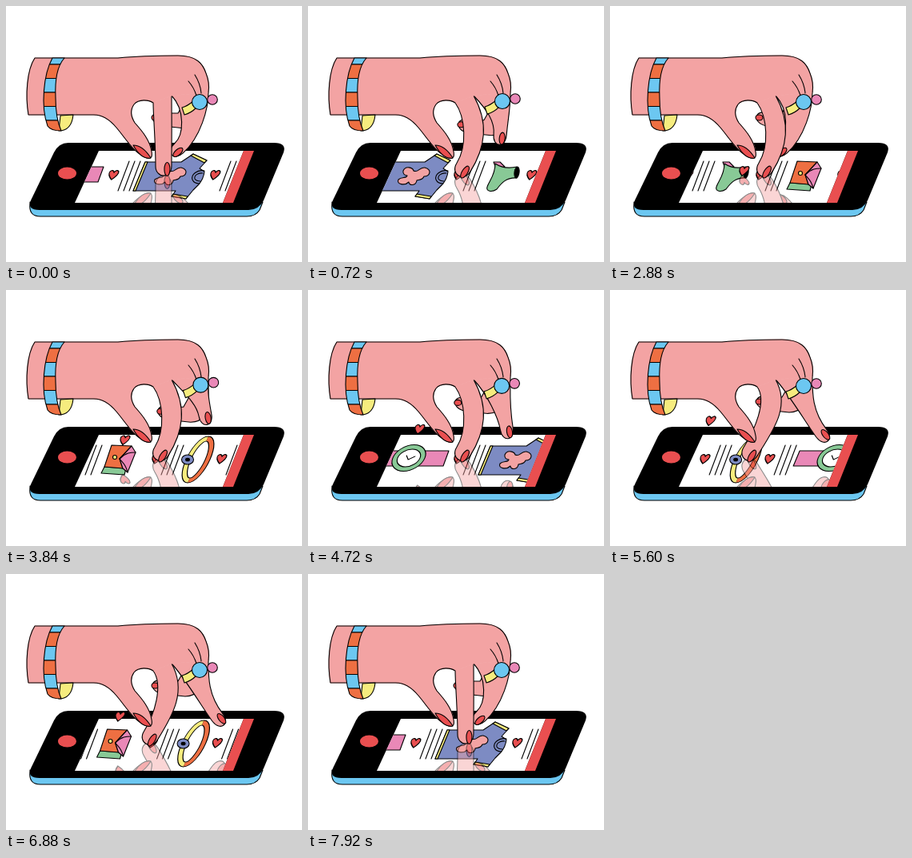
An HTML page for the animation above (8 s loop, 370 by 320 pixels).

```html
<!DOCTYPE html>
<html lang="en">
<head>
<meta charset="utf-8">
<title>Shopping swipe</title>
<style>
html, body { margin: 0; width: 100%; height: 100%; overflow: hidden; background: #fff; }
svg { display: block; width: 100vw; height: 100vh; }
.ink { stroke: #000; stroke-width: 1.1; stroke-linejoin: round; stroke-linecap: round; }
.line { fill: none; }
.skin { fill: #f3a3a3; }
.red { fill: #e94f50; }
.orange { fill: #ee6f42; }
.blue { fill: #6cc7f1; }
.yellow { fill: #f6ec7e; }
.pink { fill: #e988b7; }
.green { fill: #88c996; }
.denim { fill: #7d8bc3; }
.white { fill: #fff; }
</style>
</head>
<body>
<svg viewBox="0 0 370 320">
  <defs>
    <clipPath id="screen"><path d="M116 181H297L271 246H86Z"/></clipPath>
    <clipPath id="band"><path id="bandShape" d="M58 65C47 85 43 125 52 150Q56 156 69 156Q62 140 62 115C61 95 64 75 73 65Z"/></clipPath>
    <path id="heart" class="ink red" transform="skewX(-20) scale(1.1)" d="M0 5.5C-4 2-6-1-5-3.5C-3.5-6-.8-5 0-2.5C.8-5 3.5-6 5-3.5C6-1 4 2 0 5.5Z"/>
    <path id="rules" class="ink line" d="M20 194L6 231M27 194L13 231M34 194L20 231"/>

    <g id="shirt" class="ink">
      <path class="denim" d="M-87 195H-42L-27 185L-10 193L-19 203L-13 207Q-14 216-20 223L-27 230L-36 241L-54 238L-49 231H-102Z"/>
      <path class="yellow" d="M-27 185L-10 193L-13 196L-30 187ZM-54 238L-36 241L-34 238L-52 235ZM-87 195H-84L-99 231H-102Z"/>
      <path class="line" d="M-13 206C-22 204-30 211-28 217Q-26 222-19 222M-15 209C-21 208-26 212-25 216Q-23 219-18 219"/>
      <path class="skin" d="M-69 206C-66 199-57 202-56 206C-50 209-49 201-42 202C-32 205-36 213-43 213C-45 218-50 217-52 218C-53 225-62 225-62 220C-67 225-78 223-75 217C-71 213-65 216-64 212Q-70 211-69 206Z"/>
    </g>
    <g id="boot" class="ink">
      <path class="pink" d="M-47 195H-39L-33 201L-44 203Z"/>
      <path class="green" d="M-45 197C-36 203-27 203-18 201V215C-31 214-37 221-43 229C-49 233-57 232-55 226C-53 219-45 212-45 197Z"/>
      <ellipse cx="-18" cy="208" rx="3" ry="7" transform="rotate(8 -18 208)"/>
    </g>
    <g id="bag" class="ink">
      <path class="green" d="M-65 221L-38 223L-40 231L-69 229Z"/>
      <path class="orange" d="M-56 194L-31 195L-46 211L-42 223L-65 221Z"/>
      <path class="pink" d="M-31 195L-26 203L-36 228L-42 223L-46 211Z"/>
      <path class="line" d="M-46 211C-38 203-32 203-26 203M-46 211C-42 216-38 218-36 228"/>
      <circle class="yellow" cx="-52" cy="209" r="2.5"/>
    </g>
    <g id="bangle">
      <g transform="translate(-29 212) skewX(-24)" fill="none">
        <ellipse rx="12" ry="26" stroke="#000" stroke-width="7"/>
        <path d="M0-26A12 26 0 0 0 0 26" stroke="#f6ec7e" stroke-width="4.8"/>
        <path d="M0-26A12 26 0 0 1 0 26" stroke="#ee6f42" stroke-width="4.8"/>
      </g>
      <ellipse class="ink denim" cx="-42" cy="212" rx="7.5" ry="6"/>
      <ellipse cx="-42" cy="212" rx="3" ry="2.3"/>
    </g>
    <g id="watch" class="ink">
      <path class="pink" d="M-105 201H-12L-19 220H-113Z"/>
      <g transform="translate(-62 210) skewX(-22)">
        <ellipse class="green" rx="20" ry="16.5"/>
        <ellipse class="white" rx="14" ry="11"/>
        <path class="line" d="M-4-3L0 2L7-2"/>
      </g>
    </g>
    <g id="belt"></g>
  </defs>

  <!-- phone -->
  <path class="ink blue" d="M30 245H321L317 255Q312 263 301 263H43Q28 263 30 247Z"/>
  <path d="M78 171H335Q351 171 347 183L322 243Q316 255 303 255H42Q26 255 31 243L60 183Q66 171 78 171Z"/>
  <ellipse class="red" cx="76.5" cy="209" rx="11.5" ry="7.5"/>
  <path class="white" d="M116 181H297L271 246H86Z"/>
  <g clip-path="url(#screen)">
    <g id="strip"><use href="#belt" x="-544"/><use href="#belt"/></g>
    <use href="#hand" transform="matrix(1 0 0 -1 0 424)" opacity=".45"/>
  </g>
  <path class="red" d="M297 181H310L284 246H271Z"/>

  <g id="hand">
    <g id="curl" class="ink">
      <path class="skin" d="M246 108C248 145 238 153 224 153L196 150C186 148 181 142 184 136Q188 131 200 134L215 134L224 118"/>
      <ellipse class="red" cx="186.5" cy="139.5" rx="4.5" ry="3.5"/>
    </g>
    <g class="ink">
      <path id="middle" class="skin"/>
      <ellipse id="middleNail" class="red" rx="3.5" ry="7.5"/>
      <path id="index" class="skin"/>
      <ellipse id="indexNail" class="red" rx="3.5" ry="8.5"/>
    </g>
    <path id="palmFill" class="skin" stroke="#f3a3a3"/>
    <path id="palm" class="ink line" d="M184 121C178 117 166 116 160 123C155 130 156 138 161 146C170 156 180 168 182 182Q184 192 176 190C160 184 150 166 138 152Q124 135 108 136H28C24 112 26 80 36 65H140C160 63 190 62 215 62C238 62 246 72 250 84C254 94 254 102 253 108"/>
    <path class="ink red" d="M159 174Q171 174 181 190Q169 192 159 174Z"/>
    <path class="ink line" d="M228 94Q235 102 238 112M236 86Q243 97 244 109"/>
    <g id="ring" class="ink">
      <path class="yellow" d="M-22 7Q-15 5-8-1L-4 7Q-11 14-19 16Z"/>
      <circle class="blue" r="9.5"/>
      <circle class="pink" cx="16" cy="-3" r="6.3"/>
    </g>
    <path class="ink yellow" d="M68 137L84 136Q82 156 66 156Z"/>
    <g clip-path="url(#band)" class="ink" id="stripes"></g>
    <use href="#bandShape" class="ink line"/>
    <use id="like" href="#heart"/>
  </g>
</svg>
<script>
const LOOP = 8000, STEP = 80, RUN = LOOP - STEP;
const { PI, sin, cos, min, max, floor } = Math;
const $ = id => document.getElementById(id);
const set = (id, attrs) => {
  for (const k in attrs) $(id).setAttribute(k, attrs[k]);
};
const lerp = (a, b, k) => a + (b - a) * k;
const clamp = k => min(1, max(0, k));
const ramp = (v, from, to) => {
  const k = clamp((v - from) / (to - from));
  return k * k * (3 - 2 * k);
};
const bump = k => sin(PI * clamp(k));

// Belt: every item sits left of its heart
const widths = { shirt: 127, boot: 91, bag: 102, bangle: 81, watch: 143 };
const stops = [0];
for (const name in widths) {
  const from = stops.at(-1), to = from + widths[name];
  $('belt').innerHTML += `<use href="#rules" x="${from}"/><use href="#${name}" x="${to}"/><use href="#heart" x="${to}" y="211"/>`;
  stops.push(to);
}
const count = stops.length - 1, span = stops[count];

const stripe = 17.5;
for (let i = 0; i < 6; i++) {
  $('stripes').innerHTML += `<rect class="${i % 2 ? 'orange' : 'blue'}" x="40" y="${55.5 + i * stripe}" width="40" height="${stripe}"/>`;
}
$('palmFill').setAttribute('d', $('palm').getAttribute('d') + 'L207 112Z');

// Swipes done at share T of the run: 15 in all, slow at first, then a rush
const PEAK = .7095, SWIPE = .26;
const swipesAt = T => .117 + 15 * T
  + 2.46 * (sin(2 * PI * (T - PEAK)) + sin(2 * PI * PEAK))
  - .205 * sin(4 * PI * T);

function beltShift(n, drag) {
  const i = n % count;
  const x = 188 - lerp(stops[i], stops[i + 1], drag);
  return (x + span) % span;
}

function finger(id, left, right, handles, x, y, angle, half, reach, nail) {
  const a = angle * PI / 180, s = sin(a), c = cos(a);
  const at = (along, across) => [x - s * along + c * across, y + c * along + s * across];
  const [hl, hr] = handles;
  const curve = (...pts) => 'C' + pts.join(' ');
  set(id, {
    d: 'M' + left +
      curve([left[0] + hl[0], left[1] + hl[1]], at(-12 - reach[0], -half), at(-12, -half)) +
      curve(at(4, -half), at(4, half), at(-12, half)) +
      curve(at(-12 - reach[1], half), [right[0] + hr[0], right[1] + hr[1]], right)
  });
  set(id + 'Nail', { transform: `translate(${at(-8, nail)}) rotate(${angle})` });
}

function drawHand(T, phase) {
  // The middle finger stays out during the rush and lifts between slow swipes
  const rush = ramp(T, .55, .625) - ramp(T, .89, .97);
  const lift = bump(phase * 2 - 1) * (1 - rush) ** 2;
  const spread = max(rush, lift);
  const pull = bump(phase / SWIPE);
  const bend = 32 - 32 * pull * (1 - spread);

  set('curl', { transform: `translate(${10 * lift} ${18 * lift})` });
  finger('middle', [207, 112], [253, 108], [[17, 18], [0, 20]],
    207 + 65 * spread, 186 + 3 * spread - 29 * lift, lerp(48, -38, spread), 8, [16, 30], 3);
  finger('index', [184, 121], [207, 112], [[bend * .4, 18], [bend * .6, 34]],
    188 + pull * lerp(9, -28, spread), 212, bend, 10, [25, 36], 4.5);
  set('ring', { transform: `translate(${242 + 2 * lift} ${120 - 2 * lift})` });
}

const bezier = (a, b, c, d, k) => {
  const m = 1 - k;
  return a * m * m * m + 3 * b * m * m * k + 3 * c * m * k * k + d * k * k * k;
};

// Hearts fly off the screen one after another
function drawLike(t) {
  const n = (t - 1280) / 735, k = n - floor(n);
  set('like', {
    x: bezier(188, 138, 155, 112, k),
    y: bezier(211, 208, 165, 160, k),
    opacity: n < 0 || n >= 9 ? 0 : min(1, (1 - k) * 25)
  });
}

function draw(t) {
  const T = t / RUN, swipes = swipesAt(T);
  const n = floor(swipes), phase = swipes - n;
  set('strip', { transform: `translate(${beltShift(n, ramp(phase, 0, SWIPE))})` });
  drawHand(T, phase);
  drawLike(t);
}

function tick(now) {
  draw(floor(now % LOOP / STEP) * STEP);
  requestAnimationFrame(tick);
}
draw(0);
requestAnimationFrame(tick);
</script>
</body>
</html>
```
